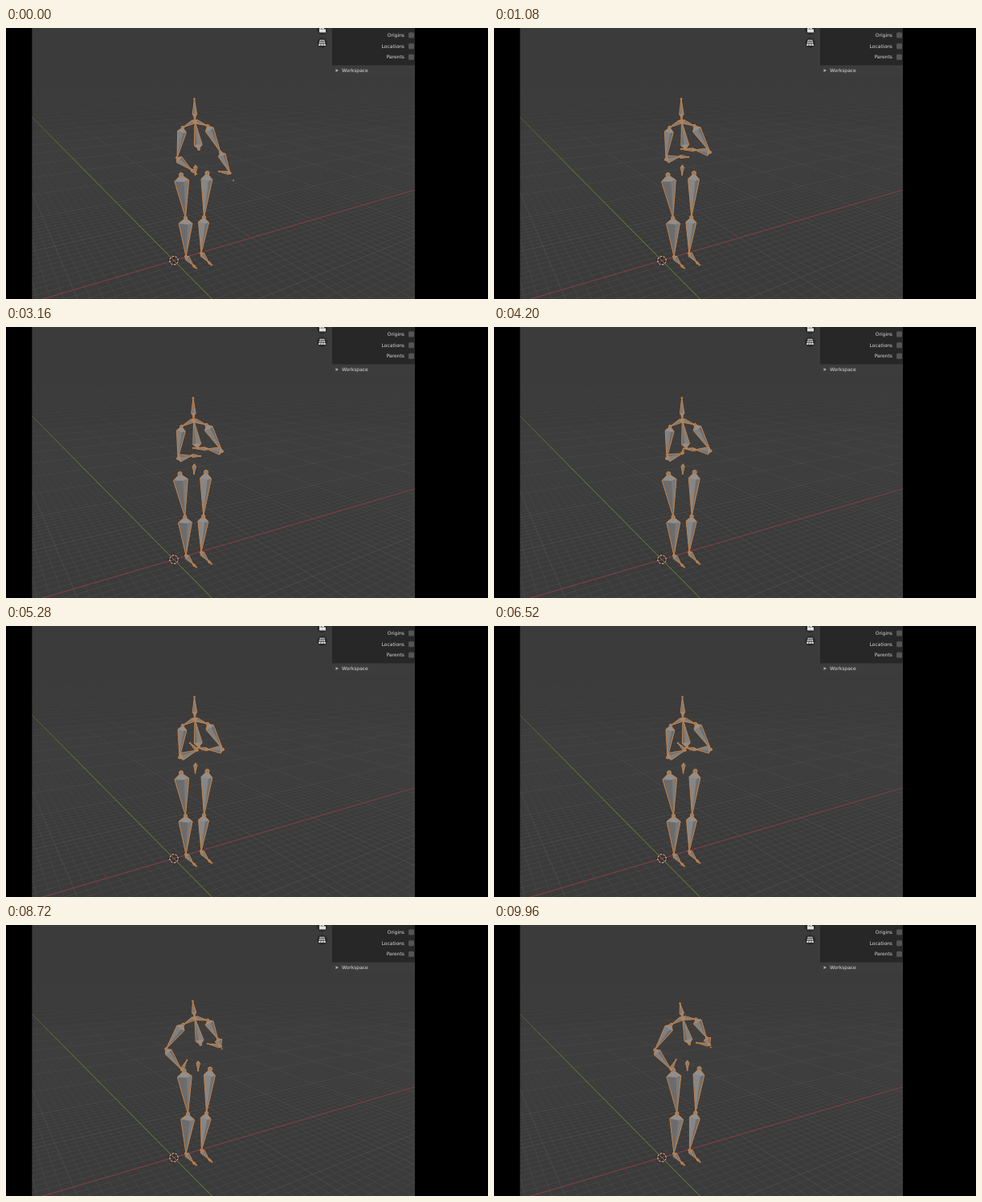
Animation, 600 px wide and 338 px high, one loop 10000 ms. Source, as an HTML page with a canvas:

```html
<!DOCTYPE html>
<html>
<head>
<meta charset="utf-8">
<style>
  html, body { margin: 0; width: 100%; height: 100%; overflow: hidden; background: #000; }
  canvas { display: block; }
</style>
</head>
<body>
<canvas id="stage" width="600" height="338"></canvas>
<script>
const LOOP = 10000;
const ctx = document.getElementById('stage').getContext('2d');

// Floor plane in perspective: origin, vanishing points of both axes, depth per unit
const ORIGIN = [209, 290], VX = [1060, 40], VY = [-38, 40], AX = 0.128, AY = 0.205;

function floorPoint(u, v) {
  const w = 1 + AX * u + AY * v;
  return [0, 1].map(i => (ORIGIN[i] + AX * u * VX[i] + AY * v * VY[i]) / w);
}

function path(g, points, close) {
  g.beginPath();
  points.forEach(p => g.lineTo(p[0], p[1]));
  if (close) g.closePath();
}

function line(g, a, b) {
  path(g, [a, b]);
  g.stroke();
}

function shape(g, points, fill) {
  g.fillStyle = fill;
  path(g, points, true);
  g.fill();
}

function disc(g, x, y, r, fill) {
  g.fillStyle = fill;
  g.beginPath();
  g.arc(x, y, r, 0, 7);
  g.fill();
}

function fade(g, rgb, alpha, top, bottom) {
  const ramp = g.createLinearGradient(0, top, 0, bottom);
  ramp.addColorStop(0, `rgba(${rgb},0)`);
  ramp.addColorStop(1, `rgba(${rgb},${alpha})`);
  return ramp;
}

function gridLines(g, step, count) {
  for (let i = -count; i <= count; i++) {
    const k = i * step;
    line(g, floorPoint((-0.85 - AY * k) / AX, k), VX);
    line(g, floorPoint(k, (-0.85 - AX * k) / AY), VY);
  }
}

function drawFloor(g) {
  g.lineWidth = 0.8;
  g.strokeStyle = fade(g, '84,84,84', 0.45, 105, 270);
  gridLines(g, 0.1, 90);
  g.strokeStyle = fade(g, '84,84,84', 0.4, 66, 170);
  gridLines(g, 1, 30);
  g.lineWidth = 1;
  g.strokeStyle = fade(g, '138,56,66', 0.95, 60, 230);
  line(g, floorPoint(-5, 0), VX);
  g.strokeStyle = fade(g, '98,136,40', 0.95, 50, 180);
  line(g, floorPoint(0, -3), VY);
}

function drawPanel(g) {
  g.fillStyle = '#272727';
  g.fillRect(406, 0, 103, 60);
  g.fillStyle = '#3c3c3c';
  g.fillRect(406, 46.5, 103, 13.5);
  g.font = '6px "DejaVu Sans", sans-serif';
  g.textAlign = 'right';
  ['Origins', 'Locations', 'Parents'].forEach((text, i) => {
    const y = 9 + i * 13.6;
    g.fillStyle = '#d8d8d8';
    g.fillText(text, 496, y + 2);
    g.fillStyle = '#545454';
    g.beginPath();
    g.roundRect(501, y - 3.4, 7, 7, 1.5);
    g.fill();
  });
  g.fillStyle = '#dedede';
  g.textAlign = 'left';
  g.fillText('Workspace', 418, 55);
  shape(g, [[410.5, 51], [414, 53], [410.5, 55]], '#aaa');
}

function drawIcons(g) {
  const dark = '#2b2b2b', light = '#e2e2e2';
  for (const y of [2, 18.5]) disc(g, 393.5, y, 6.5, dark);
  shape(g, [[390, 1.5], [398, 1.5], [398, 5.5], [390, 5.5]], light);
  for (const x of [391.3, 394.7]) disc(g, x, 0, 1.5, light);
  shape(g, [[390.8, 14.8], [396.2, 14.8], [398, 22], [389, 22]], light);
  g.strokeStyle = dark;
  g.lineWidth = 0.7;
  for (const y of [17, 19.5]) line(g, [389, y], [398, y]);
  for (const side of [-1, 1]) line(g, [393.5 + side, 14.8], [393.5 + side * 1.6, 22]);
}

function drawCursor(g) {
  const [x, y] = ORIGIN;
  g.lineWidth = 1;
  g.strokeStyle = '#151515';
  for (const [dx, dy] of [[1, 0], [-1, 0], [0, 1], [0, -1]]) {
    line(g, [x + dx * 2.5, y + dy * 2.5], [x + dx * 7.5, y + dy * 7.5]);
  }
  for (let i = 0; i < 16; i++) {
    g.strokeStyle = i % 2 ? '#e6dada' : '#c84c44';
    g.beginPath();
    g.arc(x, y, 5.2, i * Math.PI / 8, (i + 1) * Math.PI / 8);
    g.stroke();
  }
}

function makeBackdrop() {
  const layer = document.createElement('canvas');
  layer.width = 600;
  layer.height = 338;
  const g = layer.getContext('2d');
  g.fillRect(0, 0, 600, 338);
  g.beginPath();
  g.rect(32.4, 0, 476.6, 338);
  g.clip();
  g.fillStyle = '#3b3b3b';
  g.fillRect(32, 0, 477, 338);
  drawFloor(g);
  drawPanel(g);
  drawIcons(g);
  drawCursor(g);
  return layer;
}

// Upright stance
const REST = {
  crown: [234.5, 88.5], skull: [235, 111], chest: [235, 116],
  shoulderL: [220, 124], shoulderR: [251, 122],
  spine: [240, 151], pelvis: [236, 172], root: [235.5, 183],
  hipL: [218, 183], hipR: [250.5, 181],
  kneeL: [223.5, 237], kneeR: [246.5, 236],
  ankleL: [224, 285], ankleR: [243, 281]
};

// Elbow, wrist and fingertip of the left, then the right arm
const HANG = [[213, 162], [231, 177], [237, 182], [267, 155], [279, 181], [265, 179]];
const FOLDED = [[214, 164], [231, 160.5], [242, 161], [269, 155], [250, 152], [233, 151]];
const CLASPED = [[216, 164], [238, 155], [229, 146], [270, 154], [251, 154], [239, 152]];
const AKIMBO = [[197, 152], [215, 182], [222, 170], [262, 147], [265, 156], [249, 151]];

function ease(from, to, t) {
  const s = Math.max(0, Math.min(1, (t - from) / (to - from)));
  return s * s * (3 - 2 * s);
}

function blend(a, b, s) {
  return a.map((p, i) => p.map((v, k) => v + (b[i][k] - v) * s));
}

// The lean bends the body in an S above the ankles, tilts the shoulders and nods the head
function bend([x, y], lean, sway) {
  const height = Math.max(0, 285 - y);
  const lift = height > 165 && Math.abs(x - 235) < 5 ? (height - 170) * 0.35 : -2 * Math.min(1, height / 50);
  const tilt = height > 120 ? (235 - x) * 0.15 : 0;
  return [
    x + lean * 5.5 * Math.sin(height / 53) + sway * Math.min(1, height / 100),
    y + lean * (lift + tilt)
  ];
}

function poseAt(t) {
  const fold = ease(0, 1000, t), clasp = ease(3200, 5200, t), turn = ease(6500, 7350, t);
  const lean = 0.35 * turn + 0.65 * ease(7350, 9960, t);
  const sway = -1.5 * (fold - clasp);
  const pose = {};
  for (const name in REST) pose[name] = bend(REST[name], lean, sway);
  const arms = blend(blend(blend(HANG, FOLDED, fold), CLASPED, clasp), AKIMBO, turn)
    .map(p => bend(p, lean, 0));
  pose.armL = arms.slice(0, 3);
  pose.armR = arms.slice(3);
  return pose;
}

function knob([x, y], r) {
  disc(ctx, x, y, r, '#88807a');
  ctx.stroke();
}

// Octahedral bone, widest near its head
function bone(a, b, width, ends = 1.2, shades = ['#808080', '#6d6d6d']) {
  const dx = b[0] - a[0], dy = b[1] - a[1], len = Math.hypot(dx, dy) || 1;
  const nx = -dy / len * width / 2, ny = dx / len * width / 2;
  const at = (along, across) => [a[0] + dx * along + nx * across, a[1] + dy * along + ny * across];
  const left = at(0.14, 1), right = at(0.14, -1), ridge = at(0.17, -0.3);
  shape(ctx, [a, left, b, right], shades[0]);
  shape(ctx, [ridge, b, right], shades[1]);
  shape(ctx, [a, left, ridge, right], '#8f8f8f');
  path(ctx, [a, left, b, right], true);
  ctx.stroke();
  knob(a, ends);
  knob(b, ends * 0.8);
}

function drawLeg(hip, knee, ankle, width, shades) {
  const ball = [ankle[0] + 9.5, ankle[1] + 11.5];
  bone(ball, [ball[0] + 3.5, ball[1] + 3], 3, 0.9);
  bone(ankle, ball, 6);
  bone(knee, ankle, width - 1, 2, shades);
  bone(hip, knee, width, 2.6, shades);
}

function drawArm(chest, shoulder, [elbow, wrist, tip]) {
  bone(chest, shoulder, 5);
  bone(shoulder, elbow, 11, 1.8);
  bone(elbow, wrist, 9.5, 1.5);
  bone(wrist, tip, 4, 1);
}

function drawFigure(t) {
  const p = poseAt(t);
  ctx.strokeStyle = '#c98144';
  ctx.lineWidth = 1;
  ctx.lineJoin = 'round';
  drawLeg(p.hipL, p.kneeL, p.ankleL, 18, ['#6c6c6c', '#7a7a7a']);
  drawLeg(p.hipR, p.kneeR, p.ankleR, 14, ['#868686', '#707070']);
  bone(p.pelvis, p.root, 4.5, 0.9);
  bone(p.spine, p.chest, 10, 1.5);
  bone(p.chest, p.skull, 3);
  bone(p.skull, p.crown, 5.5);
  drawArm(p.chest, p.shoulderL, p.armL);
  drawArm(p.chest, p.shoulderR, p.armR);
  const [elbow, wrist] = p.armR;
  knob(wrist.map((v, k) => v + (v - elbow[k]) * 0.35), 0.6);
}

const backdrop = makeBackdrop();

function frame(now) {
  ctx.drawImage(backdrop, 0, 0);
  drawFigure(now % LOOP);
  requestAnimationFrame(frame);
}
requestAnimationFrame(frame);
</script>
</body>
</html>
```
